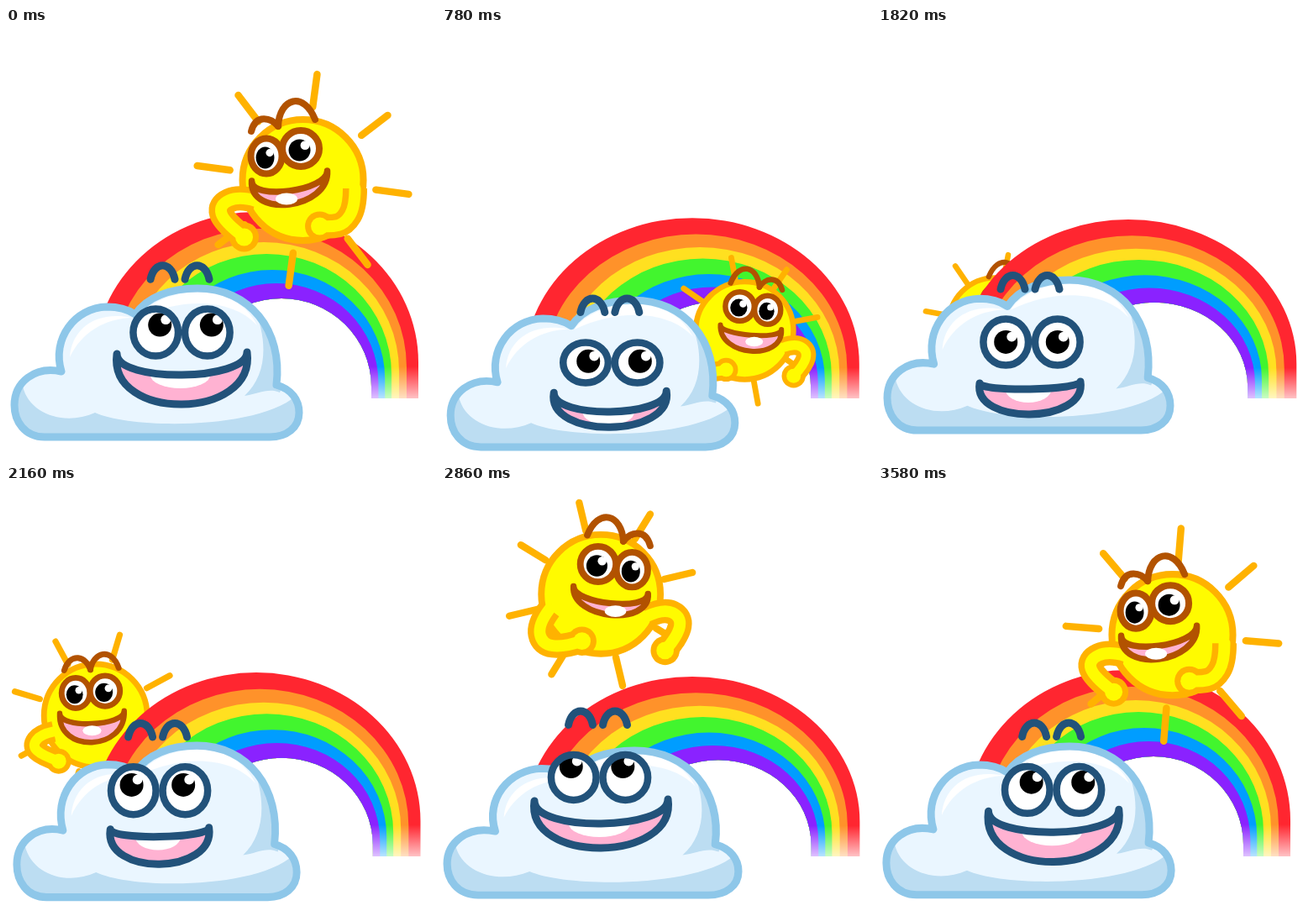
An HTML page with a canvas for the animation above (3600 ms loop, 512 by 512 pixels).

```html
<!DOCTYPE html>
<html lang="en">
<head>
<meta charset="utf-8">
<title>Sun circling a rainbow</title>
<style>
html, body { margin: 0; width: 100%; height: 100%; overflow: hidden; background: #fff; }
canvas { display: block; width: 100vw; height: 100vh; }
</style>
</head>
<body>
<canvas id="stage" width="512" height="512"></canvas>
<script>
const ctx = document.getElementById('stage').getContext('2d');
const LOOP = 3600, BEAT = 1200, TAU = Math.PI * 2, RAD = Math.PI / 180;
const KEYS = [0, 440, 1160, 1820, 2460, 2860];
const NAVY = '#22527a', BROWN = '#b25200', AMBER = '#ffb200', YELLOW = '#fffb00', PINK = '#ffb2d2';

const lerp = (a, b, k) => a + (b - a) * k;
const clamp = v => Math.min(1, Math.max(0, v));
const mix = (a, b, k) => a.map((v, i) => lerp(v, b[i], k));
const flip = points => points.map((v, i) => i % 2 ? v : -v);

// Looping smooth curve through values at uneven times.
function track(values, times = KEYS) {
  const n = values.length;
  const time = i => times[(i + n) % n] + Math.floor(i / n) * LOOP;
  const value = i => values[(i + n) % n];
  const slope = i => (value(i + 1) - value(i - 1)) / (time(i + 1) - time(i - 1));
  return t => {
    let i = n - 1;
    while (times[i] > t) i--;
    const span = time(i + 1) - time(i), u = (t - time(i)) / span;
    const u2 = u * u, u3 = u2 * u;
    const m0 = slope(i) * span, m1 = slope(i + 1 === n ? 0 : i + 1) * span;
    return value(i) * (2 * u3 - 3 * u2 + 1) + m0 * (u3 - 2 * u2 + u)
      + value(i + 1) * (3 * u2 - 2 * u3) + m1 * (u3 - u2);
  };
}

const sunTracks = {
  orbit: track([138.5, 146, 148, 136, 143, 149]),
  lead: track([-.5, .7, -3.3, -3.2, 1.2, -.1]),
  size: track([1, .945, .68, .77, .928, .985]),
  ray: track([127, 104, 76, 84, 114, 112]),
  upper: track([18, 12, 13, 15, 17, 16]),
  lower: track([34, 35, 36, 40, 42, 30])
};
const cloudTracks = {
  bottom: track([491, 498, 503, 498, 483, 503, 491, 491], [0, 440, 820, 1160, 1820, 2460, 2860, 3500]),
  width: track([347, 339, 355, 345, 341, 355]),
  height: track([185, 186, 180, 187, 188, 180]),
  eyeX: track([209, 212, 189.5, 183, 183.5, 187.5]),
  eyeY: track([362.5, 387.5, 402.5, 374, 354.5, 347]),
  eyeH: track([28, 28.5, 20, 27.5, 28.5, 27]),
  lookX: track([5, 6, 0, 0, -4, -3]),
  lookY: track([-9, -4, 0, 0, -13, -13]),
  mouthL: track([132, 141, 123, 121, 125, 110]),
  mouthR: track([287, 280, 253, 241, 247, 269]),
  mouthY: track([388, 419, 443, 423, 395, 375]),
  upper: track([26, 33, 12, 8, 14, 28]),
  lower: track([61, 46, 40, 38, 48, 57])
};
const sample = (tracks, t) =>
  Object.fromEntries(Object.entries(tracks).map(([name, f]) => [name, f(t)]));

function stroke(path, color, width, cap = 'round') {
  ctx.strokeStyle = color;
  ctx.lineWidth = width;
  ctx.lineCap = cap;
  ctx.lineJoin = 'round';
  ctx.stroke(path);
}

function fill(path, color, rule = 'nonzero') {
  ctx.fillStyle = color;
  ctx.fill(path, rule);
}

function oval(x, y, rx, ry = rx) {
  const path = new Path2D();
  path.ellipse(x, y, Math.max(rx, .1), Math.max(ry, .1), 0, 0, TAU);
  return path;
}

function clipped(path, draw) {
  ctx.save();
  ctx.clip(path);
  draw();
  ctx.restore();
}

function drawEye(x, y, rx, ry, pupil, color, width) {
  const eye = oval(x, y, rx, ry);
  fill(eye, '#fff');
  clipped(eye, () => {
    fill(oval(pupil.x, pupil.y, pupil.rx, pupil.ry), '#000');
    fill(oval(pupil.x + pupil.rx * .5, pupil.y - pupil.ry * .45, pupil.rx * .42), '#fff');
  });
  stroke(eye, color, width);
}

// Corners l and r; the lips sag from the line between them.
function drawMouth(l, r, upper, lower, tooth, color, width) {
  const path = new Path2D(), w = r[0] - l[0], up = upper * 4 / 3, low = lower * 4 / 3;
  const flare = w * tooth.flare;
  path.moveTo(...l);
  path.bezierCurveTo(l[0], l[1] + up, r[0], r[1] + up, ...r);
  path.bezierCurveTo(r[0] + flare, r[1] + low, l[0] - flare, l[1] + low, ...l);
  path.closePath();
  const drawTooth = () => fill(
    oval(tooth.x, (l[1] + r[1]) / 2 + upper + tooth.dy, tooth.rx, tooth.ry), '#fff');
  fill(path, PINK);
  if (!tooth.over) clipped(path, drawTooth);
  stroke(path, color, width);
  if (tooth.over) drawTooth();
}

function arch(path, [cx, cy, rx, ry]) {
  path.moveTo(cx - rx, 441);
  path.lineTo(cx - rx, cy);
  path.ellipse(cx, cy, rx, ry, 0, Math.PI, TAU);
  path.lineTo(cx + rx, 441);
  path.closePath();
}

function drawRainbow(sway) {
  const outer = [298, 398, 193, 179], inner = [328, 427, 107, 105];
  // Colour, depth at the crown, depth at the right foot.
  const bands = [['#ff2630', 0, 0], ['#ff922a', .194, .25], ['#ffe020', .35, .41],
    ['#42f52e', .485, .57], ['#009dff', .67, .71], ['#8a22ff', .825, .85]];
  ctx.save();
  ctx.translate(298, 441);
  ctx.scale(1 + .038 * sway, 1 - .041 * sway);
  ctx.translate(-298, -441);
  for (const [color, crown, foot] of bands) {
    const [cx, cy, rx, ry] = mix(outer, inner, crown);
    const shift = (foot - crown) * 28;
    const path = new Path2D();
    arch(path, [cx - shift, cy, rx - shift, ry]);
    arch(path, inner);
    fill(path, color, 'evenodd');
  }
  const fade = ctx.createLinearGradient(0, 403, 0, 441);
  fade.addColorStop(0, 'rgba(255,255,255,0)');
  fade.addColorStop(1, 'rgba(255,255,255,.72)');
  ctx.fillStyle = fade;
  ctx.fillRect(425, 403, 75, 39);
  ctx.restore();
}

function drawArm(points) {
  const path = new Path2D(), end = points.length - 2;
  path.moveTo(points[0], points[1]);
  for (let i = 2; i < end; i += 2) {
    const last = i + 2 === end, x = points[i], y = points[i + 1];
    path.quadraticCurveTo(x, y,
      last ? points[end] : (x + points[i + 2]) / 2,
      last ? points[end + 1] : (y + points[i + 3]) / 2);
  }
  const hand = r => oval(points[end], points[end + 1], r);
  stroke(path, AMBER, 29, 'butt');
  fill(hand(17.5), AMBER);
  stroke(path, YELLOW, 14);
  fill(hand(10.5), YELLOW);
}

function drawSun(t, sway) {
  const s = sample(sunTracks, t);
  const angle = (t * .1 - 38 + s.lead) * RAD;
  // The right-turned pose mirrors the left-turned one.
  const pair = (l, r, k = sway) => [mix(l, flip(r), k), mix(r, flip(l), k)];
  ctx.save();
  ctx.translate(245 + s.orbit * Math.cos(angle), 267 + s.orbit * Math.sin(angle));
  ctx.scale(s.size, s.size);

  const tip = s.ray / s.size, rays = new Path2D();
  for (let i = 0; i < 8; i++) {
    const a = (7.5 + t * .15 + i * 45) * RAD;
    rays.moveTo(Math.cos(a) * tip * .69, Math.sin(a) * tip * .69);
    rays.lineTo(Math.cos(a) * tip, Math.sin(a) * tip);
  }
  stroke(rays, AMBER, 8.5);

  const body = oval(0, 0, 72);
  fill(body, YELLOW);
  stroke(body, AMBER, 8);
  drawArm(mix([-56, 25, -76, 19, -100, 30, -94, 50, -70, 68],
              [-63, 17, -76, 39, -67, 65, -38, 66, -16, 55], sway));
  drawArm(mix([62, 10, 62, 32, 50, 52, 34, 56, 20, 55],
              [55, 29, 78, 15, 104, 24, 102, 49, 86, 70], sway));

  const [left, right] = pair([-61, 1], [29, -11]);
  drawMouth(left, right, s.upper, s.lower,
    { x: (left[0] + right[0]) / 2 + lerp(-3.5, 7, sway), dy: 9.5, rx: 13, ry: 7, flare: .03, over: true },
    BROWN, 7.5);

  const open = clamp((Math.abs(t - 2460) - 80) / 110);
  if (open < .25) {
    const lids = new Path2D('M-59 -27Q-42 -17 -24 -33Q2 -16 25 -42');
    stroke(lids, BROWN, 7.5);
    for (const [x, y] of [[-41, -23], [2, -27]]) {
      fill(oval(x, y, 3), '#000');
      fill(oval(x + 1, y - 1, 1), '#fff');
    }
  } else {
    const centers = pair([-43.5, -28.5], [-2.5, -37.5]);
    const sizes = [mix([18.5, 21], [22, 21.5], sway), mix([22, 21.5], [18.5, 21], sway)];
    centers.forEach(([x, y], i) => {
      const [rx, ry] = sizes[i];
      drawEye(x, y, rx, ry * open,
        { x: x - 1.5, y: y + 2, rx: rx * .59, ry: 13 * open }, BROWN, 8);
    });
  }

  const brows = pair([-29.5, -64, -38, -74, -56, -79, -61.5, -58],
                     [-29.5, -64, -28, -98, 1, -106, 14.5, -72], sway * 1.1);
  for (const b of brows) {
    const path = new Path2D();
    path.moveTo(b[0], b[1]);
    path.bezierCurveTo(...b.slice(2));
    stroke(path, BROWN, 8);
  }
  ctx.restore();
}

const cloudShape = new Path2D('M46 487C22 487 10 468 10 449C10 422 34 402 66 409C54 370 82 333 120 332' +
  'C138 332 148 337 154 341C168 320 196 310 228 310C290 310 330 360 322 425' +
  'C340 430 349 443 349 458C349 476 334 487 314 487Z');
const cloudShade = new Path2D('M8 428L20 427C28 460 70 474 106 458C150 478 300 478 345 438L360 500L0 500Z' +
  'M294 330C312 370 312 412 284 438C300 436 312 428 326 434L340 400L330 350Z');
const cloudShine = new Path2D('M76 392C78 360 105 336 150 345C118 346 90 362 76 392Z' +
  'M158 345C180 310 270 296 299 354C270 322 210 320 158 345Z');

function drawCloud(t) {
  const c = sample(cloudTracks, t);
  ctx.save();
  ctx.translate(179.5, c.bottom);
  ctx.scale(c.width / 347, c.height / 185);
  ctx.translate(-179.5, -491);
  fill(cloudShape, '#eaf6ff');
  clipped(cloudShape, () => {
    fill(cloudShade, '#bcddf2');
    fill(cloudShine, '#fff');
  });
  stroke(cloudShape, '#8ec7e9', 9);
  ctx.restore();

  drawMouth([c.mouthL, c.mouthY], [c.mouthR, c.mouthY - 2], c.upper, c.lower,
    { x: (c.mouthL + c.mouthR) / 2 - 2, dy: 0, rx: (c.mouthR - c.mouthL) * .23, ry: 16, flare: .07 },
    NAVY, 9);

  const browY = c.eyeY - 39.5 - c.eyeH * .85;
  for (const side of [-1, 1]) {
    const x = c.eyeX + side * 30.8, browX = c.eyeX - 2 + side * 20.5;
    drawEye(x, c.eyeY, 26.8, c.eyeH,
      { x: x + c.lookX, y: c.eyeY + c.lookY, rx: 14, ry: Math.min(14, c.eyeH * .6) }, NAVY, 8.5);
    const brow = new Path2D();
    brow.moveTo(browX - 14.5, browY);
    brow.bezierCurveTo(browX - 10, browY - 22, browX + 10, browY - 22, browX + 14.5, browY);
    stroke(brow, NAVY, 9);
  }
}

function draw(now) {
  const t = now % LOOP;
  const sway = (1 - Math.cos(TAU * t / BEAT)) / 2;
  const sunBehind = t > 900 && t < 2420;
  ctx.fillStyle = '#fff';
  ctx.fillRect(0, 0, 512, 512);
  if (sunBehind) drawSun(t, sway);
  drawRainbow(sway);
  if (!sunBehind) drawSun(t, sway);
  drawCloud(t);
}

const start = performance.now();
function tick() {
  draw(performance.now() - start);
  requestAnimationFrame(tick);
}
tick();
</script>
</body>
</html>
```
